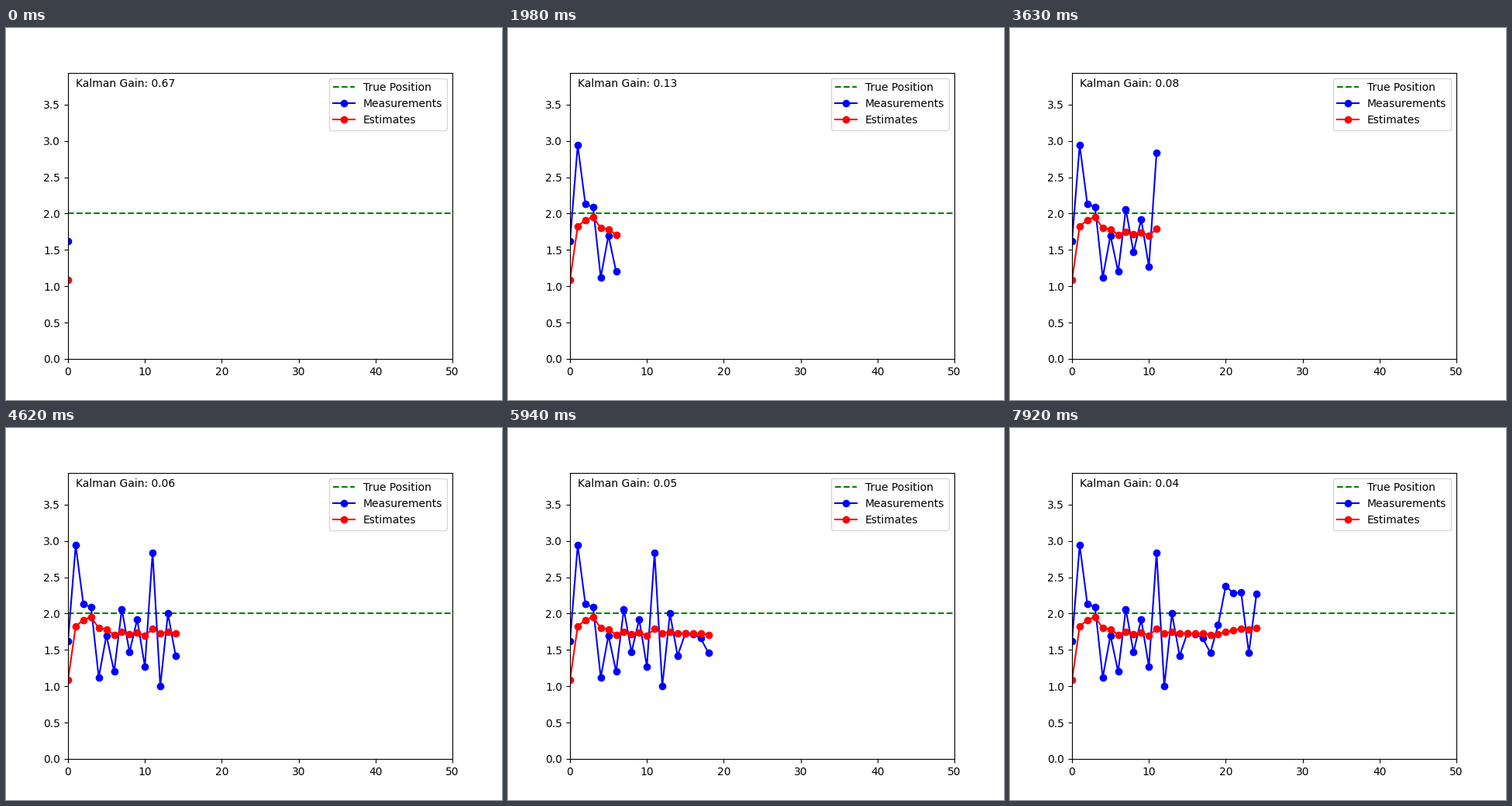
A matplotlib script for the animation above (8000 ms loop, 640 by 480 pixels).

```python
import numpy as np
import matplotlib.pyplot as plt
from matplotlib.animation import FuncAnimation

LOOP_MS, TICK_MS, STEP_MS = 8000, 40, 330
TRUE_POS = 2.0
PRIOR_VAR, NOISE_VAR = 2.0, 1.0

# noisy sensor readings; estimates, gains and limits all follow from these
measured = np.array([
    1.624, 2.94, 2.13, 2.09, 1.12, 1.70, 1.20, 2.06, 1.47, 1.92,
    1.27, 2.84, 0.997, 2.00, 1.42, 1.73, 1.72, 1.66, 1.46, 1.84,
    2.38, 2.28, 2.29, 1.46, 2.27])


def kalman(values):
    """Scalar filter for a fixed position, starting from zero."""
    x, var = 0.0, PRIOR_VAR
    estimates, gains = [], []
    for z in values:
        gain = var / (var + NOISE_VAR)
        x += gain * (z - x)
        var *= 1 - gain
        estimates.append(x)
        gains.append(gain)
    return np.array(estimates), gains


estimated, gains = kalman(measured)
steps = np.arange(len(measured))

fig, ax = plt.subplots(figsize=(6.4, 4.8), dpi=100)
ax.set_xlim(0, 50)
ax.set_ylim(measured.min() - 1, measured.max() + 1)
ax.plot([0, 50], [TRUE_POS, TRUE_POS], "g--", label="True Position")
meas_line, = ax.plot([], [], "bo-", label="Measurements")
est_line, = ax.plot([], [], "ro-", label="Estimates")
gain_text = ax.text(0.02, 0.95, "", transform=ax.transAxes)
ax.legend(loc="upper right")


def update(frame):
    # the step reached by the end of this tick
    n = ((frame + 1) * TICK_MS - 1) // STEP_MS
    meas_line.set_data(steps[:n + 1], measured[:n + 1])
    est_line.set_data(steps[:n + 1], estimated[:n + 1])
    gain_text.set_text(f"Kalman Gain: {gains[n]:.2f}")
    return meas_line, est_line, gain_text


anim = FuncAnimation(fig, update, frames=LOOP_MS // TICK_MS,
                     init_func=lambda: update(0), interval=TICK_MS,
                     repeat=True, repeat_delay=0)
plt.show()
```
